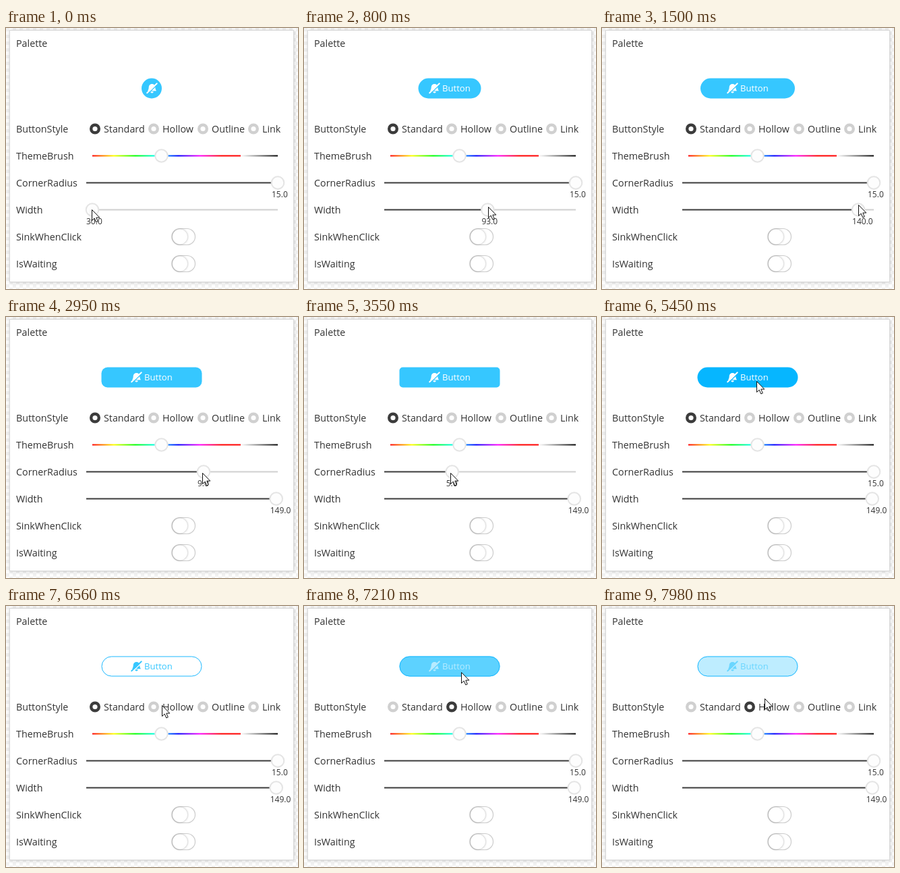
Animation of 433x387 px, one loop 8 s. Source, as an HTML page with a canvas:

```html
<!DOCTYPE html>
<html lang="en">
<head>
<meta charset="utf-8">
<title>Palette</title>
<style>
html, body { margin: 0; width: 100%; height: 100%; overflow: hidden; background: #fff; }
canvas { display: block; }
</style>
</head>
<body>
<canvas id="stage" width="433" height="387"></canvas>
<script>
const ctx = document.getElementById('stage').getContext('2d');
const LOOP = 8000;
const WHITE = [255, 255, 255], BLUE = [54, 199, 255], DEEP = [6, 182, 255];
const DARK = [60, 60, 60], GREY = [208, 208, 208];
const PICK_HOLLOW = 6560;

// Eased pointer moves: start, end, x, y of the tip
const MOVES = [
  [340, 1140, 365, 262],   // drag width
  [1160, 1930, 401, 261],
  [2280, 2480, 400, 231],
  [2560, 3380, 165, 231],  // drag corner radius
  [3400, 3830, 349, 230],
  [3930, 4260, 409, 227],
  [4400, 5110, 233, 134],
  [5210, 5450, 229, 95],   // hover the button
  [5670, 6470, 231, 147],
  [PICK_HOLLOW, 7210, 233, 98],
  [7600, 8000, 241, 137]
];

const clamp = (v, lo, hi) => Math.min(hi, Math.max(lo, v));
const mix = (a, b, k) => a + (b - a) * k;
const ease = k => k * k * (3 - 2 * k);
const progress = (t, start, end) => clamp((t - start) / (end - start), 0, 1);
const fade = (t, start) => progress(t, start, start + 200);
const blend = (a, b, k) => `rgb(${a.map((v, i) => Math.round(mix(v, b[i], k)))})`;

function pointerAt(t) {
  return MOVES.reduce(([x, y], [start, end, toX, toY]) => {
    const k = ease(progress(t, start, end));
    return [mix(x, toX, k), mix(y, toY, k)];
  }, [127, 269]);
}

function sliderValue(x, min, max) {
  return Math.round(clamp(min + (x - 128) / 275 * (max - min), min, max));
}

function text(str, x, y, size = 14.3, color = '#333', weight = 400) {
  ctx.font = `${weight} ${size}px "Open Sans", "Noto Sans", sans-serif`;
  ctx.fillStyle = color;
  ctx.fillText(str, x, y);
}

function circle(x, y, r, fill, stroke, width) {
  ctx.beginPath();
  ctx.arc(x, y, r, 0, Math.PI * 2);
  ctx.fillStyle = fill;
  ctx.fill();
  if (stroke) outline(stroke, width);
}

function outline(color, width) {
  ctx.strokeStyle = color;
  ctx.lineWidth = width;
  ctx.stroke();
}

function roundRect(x, y, w, h, r, fill) {
  ctx.beginPath();
  ctx.roundRect(x, y, w, h, r);
  ctx.fillStyle = fill;
  ctx.fill();
}

function withShadow(color, blur, paint) {
  ctx.save();
  ctx.shadowColor = color;
  ctx.shadowBlur = blur;
  paint();
  ctx.restore();
}

function drawWindow() {
  ctx.fillStyle = '#fff';
  ctx.fillRect(0, 0, 433, 387);
  ctx.fillStyle = '#f3f3f3';
  for (let y = 0; y < 387; y += 5)
    for (let x = y % 10; x < 433; x += 10) ctx.fillRect(x, y, 5, 5);
  withShadow('rgba(0,0,0,.22)', 6, () => roundRect(6, 4, 421, 373, 0, '#fff'));
  ctx.strokeStyle = '#d8d8d8';
  ctx.lineWidth = 1;
  ctx.strokeRect(5.5, 3.5, 421, 373);
}

const thumb = (x, y) => circle(x, y, 9.3, '#fdfdfd', '#e4e4e4', 2);

function bar(from, to, y, fill) {
  ctx.fillStyle = fill;
  ctx.fillRect(from, y - 1, to - from, 2);
}

function drawSlider(y, value, min, max) {
  const x = 128 + (value - min) / (max - min) * 275;
  bar(x, 403, y, '#d0d0d0');
  if (value > min) bar(119, x, y, '#3c3c3c');
  thumb(x, y);
  text(value.toFixed(1), x - 9, y + 21.5, 12);
}

function gradient(from, to, colors, step) {
  const g = ctx.createLinearGradient(from, 0, to, 0);
  colors.forEach((c, i) => g.addColorStop(i * step, c));
  return g;
}

function drawHueSlider(y) {
  const hues = ['red', 'yellow', 'lime', 'cyan', 'blue', 'magenta', 'red'];
  bar(128, 348, y, gradient(128, 348, hues, .145));
  bar(348, 403, y, gradient(348, 403, ['white', 'black'], 1));
  thumb(230.5, y);
}

function drawToggle(y) {
  roundRect(246, y - 12, 34.5, 24, 12, '#fff');
  outline('#ccc', 1.2);
  withShadow('rgba(0,0,0,.35)', 3, () => circle(258, y, 11, '#fff'));
}

function drawRadios(t) {
  const k = fade(t, PICK_HOLLOW);
  [['Standard', 132, 1 - k], ['Hollow', 219, k], ['Outline', 292, 0], ['Link', 367, 0]]
    .forEach(([label, x, on]) => {
      circle(x, 149.5, 5.8, '#fff', blend(GREY, DARK, on), 4.4);
      text(label, x + 13, 155);
    });
}

// Bell with a slash through it
function drawBell(x, y, color, back) {
  ctx.save();
  ctx.translate(x, y);
  ctx.fillStyle = color;
  ctx.beginPath();
  ctx.moveTo(-6.5, 4);
  ctx.quadraticCurveTo(-4.8, 2, -4.8, -1);
  ctx.bezierCurveTo(-4.8, -8, 4.8, -8, 4.8, -1);
  ctx.quadraticCurveTo(4.8, 2, 6.5, 4);
  ctx.closePath();
  ctx.fill();
  ctx.beginPath();
  ctx.arc(0, 5, 2.2, 0, Math.PI);
  ctx.fill();
  const slash = (style, width, shift) => {
    ctx.beginPath();
    ctx.moveTo(-7.3 + shift, 7 + shift);
    ctx.lineTo(7.3 + shift, -7 + shift);
    outline(style, width);
  };
  ctx.lineCap = 'round';
  slash(back, 1.4, 1.1);
  slash(color, 1.9, 0);
  ctx.restore();
}

function drawButton(t, width, radius) {
  const left = 216 - width / 2, top = 74.5;
  const hollow = t >= PICK_HOLLOW;
  const hover = hollow ? fade(t, 7050) - fade(t, 7846) : fade(t, 5250) - fade(t, 5850);
  const fill = hollow ? blend(WHITE, BLUE, hover) : blend(BLUE, DEEP, hover);
  const ink = hollow ? blend(BLUE, WHITE, hover * .8) : '#fff';
  roundRect(left, top, width, 30, radius, fill);
  if (hollow) {
    roundRect(left + .5, top + .5, width - 1, 29, radius - .5, fill);
    outline('#1cb9ff', 1);
  }
  ctx.save();
  ctx.beginPath();
  ctx.rect(left + 6, top, width - 12, 30);
  ctx.clip();
  const x = Math.max(left + 7, 185);
  drawBell(x + 8.5, 89.3, ink, fill);
  text('Button', x + 20, 94, 13.1, ink, 500);
  ctx.restore();
}

function drawPointer(x, y) {
  ctx.save();
  ctx.translate(Math.round(x) + .5, Math.round(y) + .5);
  ctx.beginPath();
  [[0, 0], [0, 16], [3.7, 12.6], [6.3, 18.5], [8.8, 17.4], [6.3, 11.6], [11.3, 11.6]]
    .forEach(p => ctx.lineTo(...p));
  ctx.closePath();
  ctx.fillStyle = '#fff';
  ctx.fill();
  outline('#111', 1);
  ctx.restore();
}

function draw(t) {
  const [x, y] = pointerAt(t);
  const width = t < 1970 ? sliderValue(x, 30, 150) : 149;
  const radius = t > 2560 && t < 4260 ? sliderValue(x, 0, 15) : 15;
  drawWindow();
  text('Palette', 15, 28);
  ['ButtonStyle', 'ThemeBrush', 'CornerRadius', 'Width', 'SinkWhenClick', 'IsWaiting']
    .forEach((label, i) => text(label, 15, 155 + i * 40));
  drawButton(t, width, radius);
  drawRadios(t);
  drawHueSlider(189.5);
  drawSlider(229.5, radius, 0, 15);
  drawSlider(269.5, width, 30, 150);
  drawToggle(309.5);
  drawToggle(349.5);
  drawPointer(x, y);
}

const start = performance.now();
function tick() {
  draw((performance.now() - start) % LOOP);
  requestAnimationFrame(tick);
}
tick();
</script>
</body>
</html>
```
